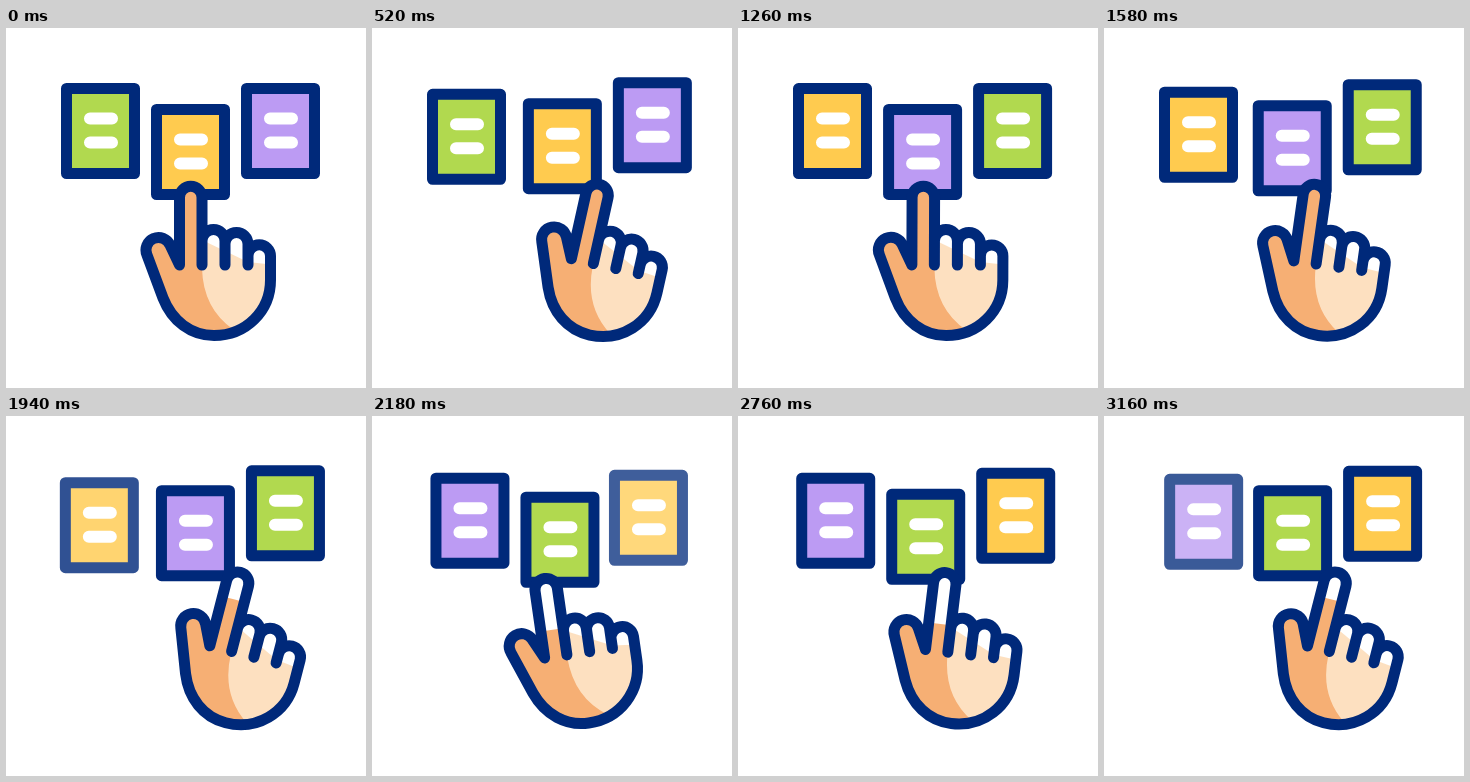
An HTML page for the animation above (3.18 s loop, 360 by 360 pixels).

```html
<!DOCTYPE html>
<html lang="en">
<head>
<meta charset="utf-8">
<title>Swipe cards</title>
<style>
  html, body { margin: 0; width: 100%; height: 100%; overflow: hidden; background: #fff; }
  svg { display: block; width: 100vw; height: 100vh; }
</style>
</head>
<body>
<svg viewBox="0 0 360 360">
  <defs>
    <path id="shape" d="M173.5 237 L164 217 A12.3 12.3 0 0 0 141 227 L157 270
      C166 293 185 307.5 208 307.5 C240 307.5 264.5 283 264.5 252
      V228 a11.25 11.25 0 0 0 -22.5 0 V237 V216 a11.5 11.5 0 0 0 -23 0
      V237 V213 a11.5 11.5 0 0 0 -23 0 V237 V169.5 a11.25 11.25 0 0 0 -22.5 0 Z"/>
    <clipPath id="inside"><use href="#shape"/></clipPath>
  </defs>
  <g id="cards"></g>
  <g id="hand">
    <g clip-path="url(#inside)">
      <path fill="#fde0c0" d="M130 150H280V320H130z"/>
      <path fill="#fff" d="M196 195H270V237L242 234 196 212z"/>
      <path fill="#f6af74" d="M130 150H196V240Q197 281 228 302V320H130z"/>
      <rect id="shine" fill="#fff" x="173" y="155" width="23"/>
    </g>
    <use href="#shape" fill="none" stroke="#00297a" stroke-width="11" stroke-linejoin="round"/>
  </g>
</svg>
<script>
const LOOP = 3180, CYCLE = 1215, PULL = 700, SWIPE = 300, SETTLE = 120;
const colors = ['#b1d94f', '#ffcb4f', '#bc9bf3'];
const hand = document.getElementById('hand');
const shine = document.getElementById('shine');
const holder = document.getElementById('cards');

holder.innerHTML = `<g>
  <rect x="5.5" y="5.5" width="68" height="85" stroke="#00297a" stroke-width="11" stroke-linejoin="round"/>
  <path d="M29 35.5h22M29 59.5h22" stroke="#fff" stroke-width="12" stroke-linecap="round"/>
</g>`.repeat(4);
const cards = [...holder.children];

const clamp = x => Math.min(1, Math.max(0, x));
const ease = x => (x = clamp(x), x * x * (3 - 2 * x));

// Slots -1, 0, 1 are left, middle, right; beyond them the spacing tightens.
function arc(slot) {
  const a = Math.abs(slot);
  const u = Math.sign(slot) * (a > 1 ? 1 + (a - 1) * 0.61 : a);
  return [145 + 90 * u, 76 - 21 * Math.abs(u) ** 2.6];
}

function draw(now) {
  const t = now % LOOP;
  const cycle = Math.floor(t / CYCLE);
  const u = t - cycle * CYCLE;
  const p = clamp((u - PULL) / SWIPE);
  const s = ease(p);
  const pull = ease(u / PULL) * (1 - s);
  const back = ease((u - PULL - SWIPE) / SETTLE);
  const lean = [cycle === 2 ? [7, 4] : [0, 7], [7, -7], [7, -7], [0, 0]];
  const alpha = [clamp(1 - p / 0.45), 1, 1, clamp((p - 0.55) / 0.45)];

  cards.forEach((card, i) => {
    const [x, y] = arc(i - 1 - s);
    const [dx, dy] = lean[i];
    card.setAttribute('transform', `translate(${x + dx * pull} ${y + dy * pull})`);
    card.setAttribute('opacity', alpha[i]);
    card.firstElementChild.setAttribute('fill', colors[(cycle + i) % 3]);
  });

  const angle = 15 * pull - 9 * s * (1 - back);
  hand.setAttribute('transform', `translate(${26 * pull} ${pull}) rotate(${angle} 208 252)`);
  shine.setAttribute('height', t < 1900 ? 0 : t > 2100 && t < 2950 ? 55 : 31);
}

const start = performance.now();
function tick() {
  draw(performance.now() - start);
  requestAnimationFrame(tick);
}
tick();
</script>
</body>
</html>
```
